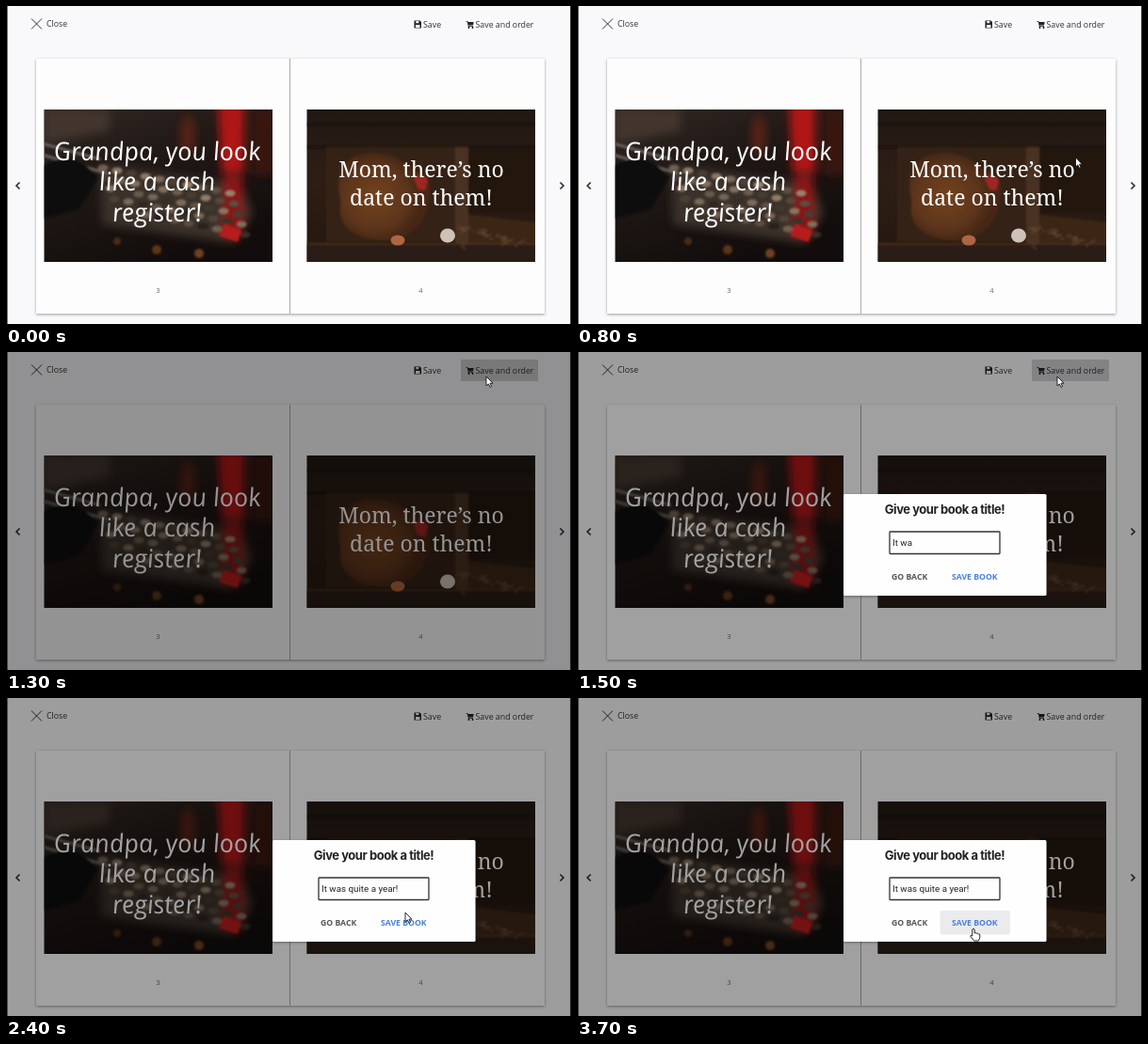
An HTML page for the animation above (4.1 s loop, 600x338 px).

```html
<!DOCTYPE html>
<html lang="en">
<head>
<meta charset="utf-8">
<title>Save the book</title>
<style>
  html, body { margin: 0; width: 100%; height: 100%; overflow: hidden; background: #f9f8fa; }
  svg { display: block; width: 600px; height: 338px; }
  text { font: 8.8px "Open Sans", sans-serif; fill: #333; white-space: pre; }
  .mid { text-anchor: middle; }
  .page { font-size: 7.5px; fill: #666; }
  .hand { font: italic 400 27px "Open Sans", sans-serif; fill: #fff; }
  .type { font: 500 23px "Noto Serif", serif; fill: #fff; }
  .title { font: 700 13px Inter, sans-serif; letter-spacing: -.45px; fill: #222; }
  .field { font: 9.8px Roboto, sans-serif; fill: #222; }
  .action { font-weight: 700; font-size: 8.7px; fill: #555; }
  .line { fill: none; stroke: #333; }
</style>
</head>
<body>
<svg viewBox="0 0 600 338">
  <defs>
    <filter id="soft" x="-50%" y="-50%" width="200%" height="200%"><feGaussianBlur stdDeviation="5"/></filter>
    <filter id="haze"><feGaussianBlur stdDeviation=".9"/></filter>
    <filter id="shade" x="-10%" y="-10%" width="120%" height="125%">
      <feDropShadow dx="0" dy="1" stdDeviation="1.8" flood-opacity=".38"/>
    </filter>
    <linearGradient id="dark" x2=".5" y2="1">
      <stop stop-color="#322923"/><stop offset=".4" stop-color="#211916"/><stop offset="1" stop-color="#120d0c"/>
    </linearGradient>
    <linearGradient id="wood" x2="0" y2="1">
      <stop stop-color="#211812"/><stop offset=".45" stop-color="#2d1e15"/><stop offset="1" stop-color="#24170f"/>
    </linearGradient>
    <radialGradient id="hen" cx=".4" cy=".5">
      <stop stop-color="#74431f"/><stop offset=".7" stop-color="#5d351c"/><stop offset="1" stop-color="#472816"/>
    </radialGradient>
    <clipPath id="left"><path d="M40.500 110h242.500v162h-242.500z"/></clipPath>
    <clipPath id="right"><path d="M319.500 110h242.500v162h-242.500z"/></clipPath>
  </defs>

  <rect width="600" height="338" fill="#f9f8fa"/>
  <rect x="32" y="56" width="540" height="271" fill="#fdfdfe" filter="url(#shade)"/>
  <path d="M301.500 56v271" stroke="#aaa"/>
  <text class="mid page" x="161.500" y="305">3</text>
  <text class="mid page" x="440.500" y="305">4</text>

  <g clip-path="url(#left)">
    <rect x="40" y="110" width="244" height="162" fill="url(#dark)"/>
    <g filter="url(#soft)">
      <path d="M40 110h70v22l-70 14z" fill="#43362d"/>
      <path d="M100 168l150 22 12 30-20 32-140-20z" fill="#3a3029"/>
      <path d="M225 105h28v72h-24z" fill="#b01518"/>
      <path d="M231 180h20v66h-20z" fill="#8c1514"/>
      <ellipse cx="193" cy="138" rx="8" ry="22" fill="#562019"/>
      <path d="M262 110h22v70h-22z" fill="#38130f"/>
    </g>
    <g filter="url(#haze)">
      <path d="M38 146l62 17M38 158l70 20" stroke="#655e58" stroke-width="3"/>
      <path d="M40 170q30-20 58 12l-20 34-38 10z" fill="#100d0d"/>
      <g id="keys"></g>
      <path d="M232 232l18 6-4 13-20-7z" fill="#b51d1b"/>
      <circle cx="160" cy="259" r="5" fill="#5b3519"/>
      <circle cx="205" cy="263" r="5" fill="#704020"/>
      <circle cx="118" cy="250" r="4" fill="#4b2c18"/>
    </g>
  </g>
  <g class="mid" transform="translate(161.500 0)">
    <text class="hand" transform="translate(0 164) skewX(8)">Grandpa, you look</text>
    <text class="hand" transform="translate(0 196) skewX(8)">like a cash</text>
    <text class="hand" transform="translate(0 229) skewX(8)">register!</text>
  </g>

  <g clip-path="url(#right)">
    <rect x="319" y="110" width="244" height="162" fill="url(#wood)"/>
    <g filter="url(#haze)">
      <path d="M319 150h244M319 126h244" stroke="#17100c" stroke-width="2"/>
      <path d="M340 150h138v100h-138z" fill="#352116"/>
      <path d="M355 205q-8-34 16-46 34-10 64 16 16 6 15 22-1 45-45 53-46-2-50-29z" fill="url(#hen)"/>
      <path d="M477 150h14v102h-14z" fill="#4a3121"/>
      <path d="M491 152h72v68h-72z" fill="#21160f"/>
      <path d="M491 222l72 8v24h-72z" fill="#3a2619"/>
      <path d="M319 252h244v20h-244z" fill="#2c1c12"/>
      <path d="M319 253h244" stroke="#513522" stroke-width="1.500"/>
      <path id="straw" stroke="#79583b" stroke-width=".8"/>
      <path d="M433 184q3-6 7-3 5-2 8 5l-3 10-7-1z" fill="#9c2522"/>
    </g>
    <ellipse cx="416" cy="249" rx="7.500" ry="5.500" fill="#ad6642"/>
    <ellipse cx="469" cy="244" rx="8" ry="7.500" fill="#cfc3b9"/>
  </g>
  <text class="mid type" x="441" y="182">Mom, there’s no</text>
  <text class="mid type" x="441" y="212">date on them!</text>

  <rect id="orderHover" x="483" y="8" width="82" height="23" rx="1" fill="#cfced0"/>
  <path class="line" d="M27 13.500l11 11m0-11l-11 11"/>
  <text x="43" y="22">Close</text>
  <path d="M433.500 15.500h6l1.500 1.500v6.500h-7.500z" fill="#222"/>
  <path d="M435.300 16h3v2.300h-3zM435 20h4.500v3h-4.500z" fill="#f9f8fa"/>
  <text x="443" y="22.500" fill="#222">Save</text>
  <path d="M488.500 16h1.800l.4 1h6l-.7 3.500h-4.600l.2.800h4.500v.8h-5.200l-1.100-5.300h-1.300z" fill="#222"/>
  <circle cx="491.500" cy="23" r=".9"/><circle cx="495.500" cy="23" r=".9"/>
  <text x="498.500" y="22.500">Save and order</text>
  <path class="line" stroke-width="1.700" d="M14.500 187.500l-3.500 3.500 3.500 3.500M588.500 187.500l3.500 3.500-3.500 3.500"/>
  <rect id="dim" width="600" height="338"/>
  <path d="M0 0h1.500v338h-1.500zM599.300 0h.7v338h-.7z"/>

  <g id="dialog">
    <rect x="283" y="151" width="215.500" height="108" rx="1.500" fill="#fefefe" filter="url(#shade)"/>
    <text class="mid title" x="390.500" y="172">Give your book a title!</text>
    <rect class="line" x="332" y="191" width="117" height="23.500" rx=".8" stroke-width="1.300"/>
    <text id="entry" class="field" x="335" y="206"></text>
    <rect id="saveHover" x="385.500" y="226" width="74.500" height="25.500" rx="2" fill="#ebebee"/>
    <text class="action" x="334" y="242">GO BACK</text>
    <text class="action" x="398" y="242" style="fill:#4a80dc">SAVE BOOK</text>
  </g>

  <g id="cursor" stroke="#111" stroke-width=".9" stroke-linejoin="round" fill="#fff">
    <path id="arrow" d="M0 0v10l2.300-2.100 1.700 3.400 1.600-.8-1.600-3.300h3z"/>
    <path id="pointer" d="M-1.200 1q1.200-2 2.400 0v4q1.200-.9 2 .3 1.300-.7 2 .5 1.500-.3 1.600 1.200v2.500l-1.300 3.500h-5l-3.800-4.800q0-1.800 2.100-.2z"/>
  </g>
</svg>
<script>
const LOOP = 4100, STEP = 100, TITLE = "It was quite a year!";
const $ = id => document.getElementById(id);
const show = (id, on) => $(id).setAttribute("visibility", on ? "visible" : "hidden");

// [time, x, y] of the cursor's tip
const path = [
  [600, 545, 295], [1000, 514, 27], [1200, 513, 26], [1300, 510, 26], [1800, 510, 26],
  [1900, 492, 55], [2000, 464, 98], [2400, 424, 228], [2500, 421, 245], [LOOP, 421, 245]
];

function tipAt(t) {
  const i = Math.max(1, path.findIndex(p => p[0] >= t));
  const [a, b] = [path[i - 1], path[i]];
  const k = (t - a[0]) / (b[0] - a[0]);
  return [1, 2].map(n => a[n] + (b[n] - a[n]) * k);
}

function drawPhotoParts() {
  let keys = "", straw = "";
  for (let row = 0; row < 5; row++) {
    for (let col = 0; col < 10; col++) {
      const x = 103 + col * 15 + row * 4, y = 172 + row * 11 + col * 3;
      const light = 38 + 14 * Math.sin(col * 2.3 + row * 4.1) - row * 3;
      if (x < 262 && y < 246)
        keys += `<ellipse cx="${x}" cy="${y}" rx="5.500" ry="3.400" fill="hsl(28 17% ${light}%)"/>`;
    }
  }
  for (let i = 0; i < 24; i++)
    straw += `M${480 + i * 37 % 66} ${236 + i * 11 % 20}l${8 * Math.cos(i * 2)} ${4 * Math.sin(i * 3)}`;
  $("keys").innerHTML = keys;
  $("straw").setAttribute("d", straw);
}

function draw(now) {
  const t = Math.floor(now % LOOP / STEP) * STEP;
  const onOrder = t >= 1000 && t < 1300, onSave = t >= 2500;
  const open = t >= 1400, moving = t >= 600;

  $("dim").setAttribute("opacity", t < 1300 ? 0 : t < 1400 ? .42 : .37);
  show("orderHover", t >= 1000 && t < 1900);
  show("dialog", open);
  show("saveHover", onSave);
  const size = t < 1500 ? .85 : 1;
  $("dialog").setAttribute("transform", `translate(390.75 205) scale(${size}) translate(-390.75 -205)`);
  $("entry").textContent = TITLE.slice(0, Math.max(0, (t - 1400) / 20));

  show("arrow", moving && !onOrder && !onSave);
  show("pointer", onOrder || onSave);
  if (moving) $("cursor").setAttribute("transform", `translate(${tipAt(t)})`);
  requestAnimationFrame(draw);
}

// Hidden parts of a closed dialog follow their group
drawPhotoParts();
draw(0);
</script>
</body>
</html>
```
